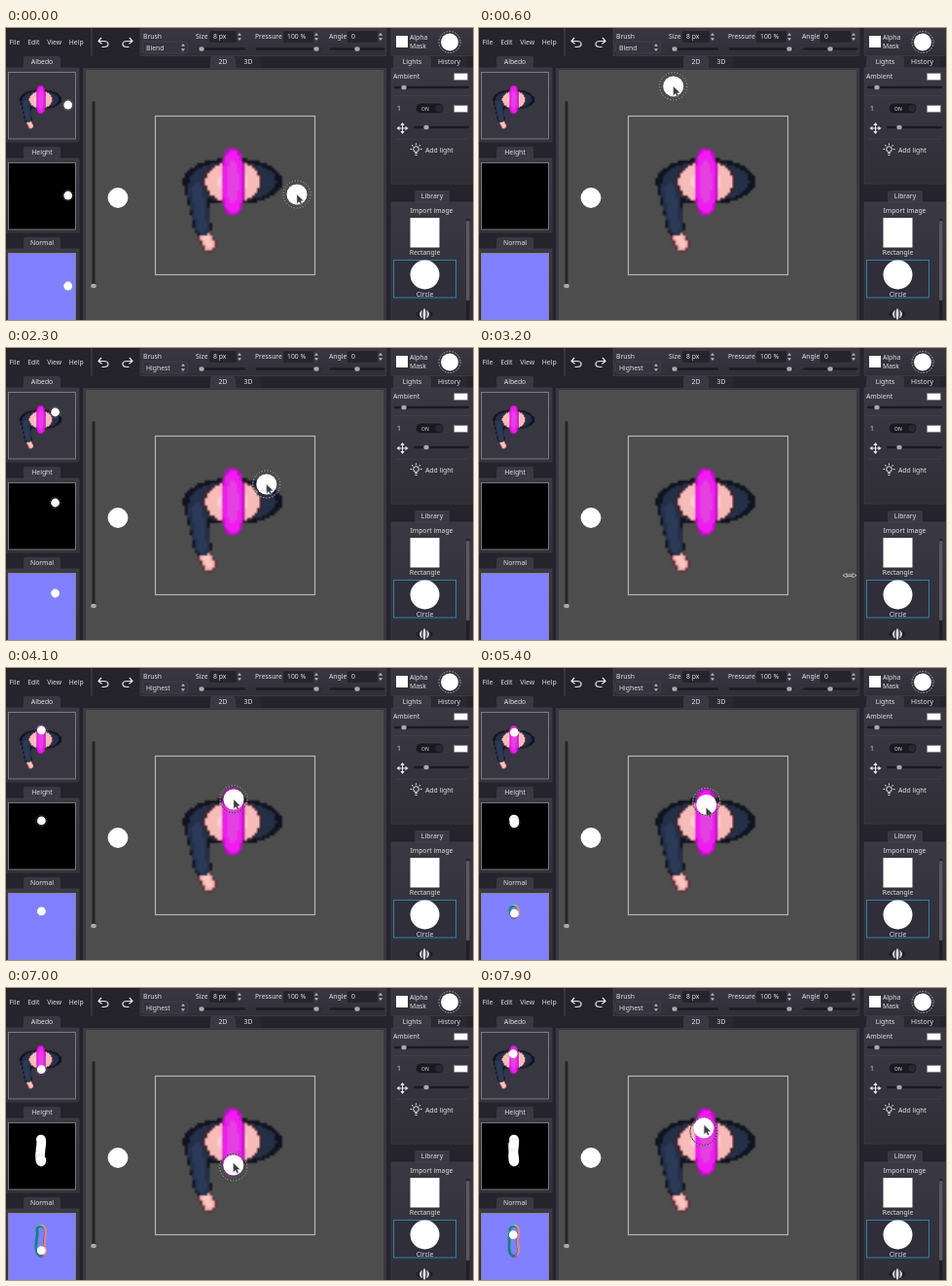
These frames come from a looping animation (480 px wide and 300 px high, 8000 ms). An HTML page with a canvas:

```html
<!DOCTYPE html>
<html lang="en">
<head>
<meta charset="utf-8">
<title>Brush blend modes</title>
<style>
html, body { margin: 0; width: 100%; height: 100%; overflow: hidden; background: #25232b; }
#stage { position: relative; width: 480px; height: 300px; overflow: hidden; }
#stage > * { position: absolute; left: 0; top: 0; }
#stage > #sprite { left: 153px; top: 90px; width: 164px; height: 164px; }
#stage > #mini { left: 2.4px; top: 45px; width: 69px; height: 69px; }
text { font: 6.8px "Noto Sans", sans-serif; fill: #e2e2e4; }
</style>
</head>
<body>
<div id="stage">
  <svg id="ui" width="480" height="300"></svg>
  <canvas id="sprite" width="64" height="64"></canvas>
  <canvas id="mini" width="64" height="64"></canvas>
  <svg id="live" width="480" height="300"></svg>
</div>
<script>
const $ = id => document.getElementById(id);

// --- interface helpers ---
const txt = (x, y, s, extra = '') => `<text x="${x}" y="${y}" ${extra}>${s}</text>`;
const mid = (x, y, s) => txt(x, y, s, 'text-anchor="middle"');
const box = (x, y, w, h, fill, extra = '') =>
  `<rect x="${x}" y="${y}" width="${w}" height="${h}" fill="${fill}" ${extra}/>`;
const line = (d, color = '#e8e8ea', w = 1.2) =>
  `<path d="${d}" fill="none" stroke="${color}" stroke-width="${w}"/>`;
const solid = (d, fill = '#e0e0e2') => `<path d="${d}" fill="${fill}"/>`;
const disc = (x, y, r, fill = '#fff') => `<circle cx="${x}" cy="${y}" r="${r}" fill="${fill}"/>`;
const oval = (x, y, rx, ry, fill) => `<ellipse cx="${x}" cy="${y}" rx="${rx}" ry="${ry}" fill="${fill}"/>`;
const panel = (x, y, w, h) => box(x, y, w, h, 'url(#face)', 'stroke="#45434f" stroke-width=".6"');
const tab = (x, y, w, s, on = true) =>
  solid(`M${x} ${y + 12}V${y + 2}q0-2 2-2H${x + w - 2}q2 0 2 2V${y + 12}Z`, on ? '#3a3843' : '#2a2830') +
  mid(x + w / 2, y + 8.3, s);
const slider = (x, y, w, knob) =>
  box(x, y - 1.2, w, 2.4, '#1b1a20', 'rx="1.2"') + oval(knob, y, 2.7, 2.3, '#a9a8ae');
const updown = (x, y) => solid(`M${x - 2} ${y - 1.2}l2-2.8 2 2.8zM${x - 2} ${y + 1.2}l2 2.8 2-2.8z`, '#b9b8be');
const spin = (label, x, value, vx, ax) =>
  txt(x, 11.3, label) + box(vx - 4, 3, ax - vx + 1, 12, '#26242b', 'rx="2"') + txt(vx, 11.3, value) + updown(ax, 9);
const swatch = y => box(460.5, y, 14, 7, '#fff', 'stroke="#77757e" stroke-width=".6"');
const thumbY = i => 45 + i * 93;
const thumb = (s, i, fill) =>
  tab(18, thumbY(i) - 16, 38, s) + panel(0, thumbY(i) - 4, 75, 76) +
  box(2.5, thumbY(i) + .5, 69, 68.5, fill, 'stroke="#8f8e95" stroke-width=".8"');

// four-way arrow: one arm, turned
const moveIcon = [0, 90, 180, 270].map(a =>
  `<path transform="translate(407.5 103) rotate(${a})" d="M0 .5V-.5H3V-2.2L6 0 3 2.2V.5Z" fill="#e8e8ea"/>`).join('');
const rays = [0, 45, 90, 135, 180].map(a =>
  `<path transform="translate(421.5 124.5) rotate(${-a})" d="M4.3 0H6" stroke="#eee"/>`).join('');

$('ui').innerHTML = `
<defs><linearGradient id="face" x2="0" y2="1">
  <stop stop-color="#3a3843"/><stop offset="1" stop-color="#302e37"/>
</linearGradient></defs>` +
  box(0, 0, 480, 300, '#25232b') +
  txt(3.5, 16.5, ['File', 'Edit', 'View', 'Help'].map((s, i) => `<tspan dx="${i && 7.8}">${s}</tspan>`).join('')) +
  line('M88 0V29', '#4a4853', 1) +
  line('M98 10l-3 3.5 3.5 2.7M95.5 13.5h5c6 0 6 6 0 6h-2') +
  line('M127 10l3 3.5-3.5 2.7M129.5 13.5h-5c-6 0-6 6 0 6h2') +
  panel(138, -1, 253, 29.5) + panel(396, -1, 85, 29.5) +
  txt(141, 10.6, 'Brush') + box(140.5, 14, 46, 12, '#35333d', 'rx="2" stroke="#4a4854" stroke-width=".6"') + updown(182, 20) +
  spin('Size', 195, '8 px', 213, 240) + spin('Pressure', 256, '100 %', 289, 319) + spin('Angle', 332, '0', 355, 385) +
  slider(197, 21.5, 49, 201) + slider(257, 21.5, 66, 319) + slider(333, 21.5, 56, 361) +
  box(401, 8, 12, 12, '#fff') + txt(415, 12, 'Alpha') + txt(415, 20.5, 'Mask') +
  disc(456, 14.5, 9) +
  '<circle cx="456" cy="14.5" r="11" fill="none" stroke="#c8c8cc" stroke-width=".8" stroke-dasharray="1.5"/>' +
  thumb('Albedo', 0, '#383641') + thumb('Height', 1, '#000') + thumb('Normal', 2, '#8080ff') +
  tab(210, 29, 26, '2D') + tab(236, 29, 26, '3D', false) +
  box(79, 41, 312, 260, '#393742') + box(82, 43, 306, 258, '#4d4d4d') +
  box(88.5, 75, 3, 190, '#25242a', 'rx="1.5"') + oval(90, 265, 2.8, 2.2, '#a9a8ae') +
  disc(115, 174.5, 10.4) +
  box(153.5, 90.5, 164, 163, 'none', 'stroke="#b4b4b4" stroke-width="1.2"') +
  tab(398, 29, 39, 'Lights') + tab(437, 29, 37, 'History', false) + panel(396, 41, 85, 119) +
  txt(398, 52, 'Ambient') + swatch(46.5) + slider(399, 61, 77, 409) +
  line('M399 69.5h77M399 114h77', '#4a4853', .6) +
  txt(402, 85.3, '1') + box(421, 77, 29, 11, '#191a20', 'rx="5.5" stroke="#4a4954" stroke-width=".6"') +
  txt(427, 84.5, 'ON', 'style="font-size:5px"') + disc(445, 82.5, 3.6, '#252a35') + swatch(79.5) +
  moveIcon + slider(419, 102, 57, 432) +
  '<circle cx="421.5" cy="124.5" r="2.8" fill="none" stroke="#eee"/>' + rays +
  line('M420 128.5h3M420.5 130.5h2', '#eee', .9) + txt(431, 127.5, 'Add light') +
  tab(420, 167, 36, 'Library') + panel(396, 179, 85, 122) + mid(437.5, 190.3, 'Import image') +
  box(415.5, 195, 30, 30.5, '#fff') + mid(430.5, 233, 'Rectangle') +
  box(398.5, 238.5, 64, 38.5, '#302e38', 'stroke="#2c83ad"') + disc(430.5, 253.5, 15) + mid(430.5, 275.8, 'Circle') +
  oval(430, 294, 9, 4, '#1b2233') + oval(430, 294, 5, 4.5, '#e8d2d2') + oval(430, 294, 2.8, 6.5, '#26262e') +
  oval(430, 294, 1.5, 6, '#dcdce2') +
  box(473, 196, 3.5, 104, '#222027', 'rx="1.5"') + box(473, 198, 3.5, 82, '#5a5863', 'rx="1.5"');

// --- pixel character: fields that are 0 at the core and 1 on the rim ---
const lens = (cx, cy, rx, ry, px = 2, py = 2) => (x, y) =>
  Math.sqrt(Math.abs((x - cx) / rx) ** px + Math.abs((y - cy) / ry) ** py);
const limb = (x1, y1, r1, x2, y2, r2) => (x, y) => {
  const dx = x2 - x1, dy = y2 - y1;
  const u = Math.min(1, Math.max(0, ((x - x1) * dx + (y - y1) * dy) / (dx * dx + dy * dy)));
  return Math.hypot(x - x1 - dx * u, y - y1 - dy * u) / (r1 + (r2 - r1) * u);
};
const shoulders = lens(233, 157.5, 51, 23.5, 2.2), arm = limb(196, 166, 12, 202, 205, 9);
const layers = [
  { field: limb(204, 214, 7, 209, 222, 8), rim: .8, tones: ['#fbc6c0', '#f4aeac', '#5c333b'] },
  { field: (x, y) => Math.min(shoulders(x, y), arm(x, y)), rim: .86, tones: ['#2b3b57', '#243049', '#10141f'] },
  { field: lens(233, 158, 31, 23), rim: .91, tones: ['#fdcfca', '#f6bab9', '#3c2530'] },
  { field: lens(233, 158, 12, 35.5, 2, 3), rim: .86, tones: ['#e440e2', '#f01cf0', '#bb12c2'] }
];

const art = $('sprite').getContext('2d'), px = 164 / 64;
for (const { field, rim, tones } of layers)
  for (let j = 0; j < 64; j++) for (let i = 0; i < 64; i++) {
    const v = field(153 + (i + .5) * px, 90 + (j + .5) * px);
    if (v > 1) continue;
    art.fillStyle = tones[v > rim ? 2 : v > .5 ? 1 : 0];
    art.fillRect(i, j, 1, 1);
  }
$('mini').getContext('2d').drawImage($('sprite'), 0, 0);

// --- moving layer ---
const modes = ['Blend', 'Add', 'Subtract', 'Multiply', 'Highest', 'Lowest'];
const rowY = i => 33.7 + i * 8.9;
const trail = (dx, dy, color, w) =>
  `<use href="#trail" x="${dx}" y="${dy}" stroke="${color}" stroke-width="${w}"/>`;
const dab = '<g class="dab"><circle r="10.5" fill="#fff"/><circle r="13.5" fill="none" stroke="#999" stroke-width="1.2" stroke-dasharray="2"/></g>';
const preview = (i, body) =>
  `<g transform="translate(2.4 ${thumbY(i)}) scale(.42) translate(-153 -90)"><g clip-path="url(#frame)">${body}${dab}</g></g>`;
// rim colours follow the surface normal
const slopes = [270, 90, 45, 135, 0, 180].map(a => {
  const c = Math.cos(a * Math.PI / 180), s = Math.sin(a * Math.PI / 180);
  return trail(2.6 * c, -2.6 * s, `rgb(${128 + 110 * c},${128 + 100 * s},128)`, 21);
}).join('');

$('live').innerHTML = `
<defs>
  <path id="trail" fill="none" stroke-linecap="round" stroke-linejoin="round"/>
  <clipPath id="frame"><rect x="153" y="90" width="164" height="164"/></clipPath>
</defs>` +
  preview(0, '') + preview(1, trail(0, 0, '#fff', 23)) + preview(2, slopes + trail(0, 0, '#8080ff', 13)) + `
<g id="mode">${txt(144, 22.5, '')}</g>
<g id="menu">${box(143, 28, 42.5, 57, '#28262e', 'stroke="#47454f" stroke-width=".6"')}
  <rect id="pick" x="143.5" width="41.5" height="9" fill="#4a4854"/>` +
  modes.map((s, i) => disc(150, rowY(i), 3, '#dcdce0') + (i ? '' : disc(150, rowY(i), 1.8, '#28262e')) +
    txt(155.5, rowY(i) + 2.4, s)).join('') + `</g>
<g id="brush">
  <g id="ring" fill="none" stroke-width=".9"><circle r="14" stroke="#333"/><circle r="14" stroke="#bbb" stroke-dasharray="1.5"/></g>
  <circle id="tip" r="10.5" fill="#fff"/>
</g>
<path id="arrow" d="M0 0V9.5L2.3 7.4 3.9 10.6 5.4 9.9 4 6.8 6.8 6.5Z" fill="#3a3a40" stroke="#bbb" stroke-width=".5"/>
<g id="resize" stroke="#ccc" stroke-width=".8" fill="#333"><path d="M-7 0l4-2v4zM7 0l-4-2v4z"/><path d="M-3 -.8h6M-3 .8h6"/></g>`;

// pointer stops: time, x, y
const stops = [
  [0, 299, 171], [900, 165, 21], [1050, 165, 21], [1500, 166, 68], [1950, 167, 71],
  [2800, 440, 258], [2900, 440, 258], [3850, 190, 155], [4100, 234, 135], [4950, 233, 132]
];
const paintStart = 4400, sweepStart = 4950;
const pos = t => {
  t = Math.max(t, 0);
  if (t >= sweepStart) // one slow stroke down and back up
    return { x: 232.3 + 1.5 * Math.sin(t / 260), y: 159 - 27 * Math.cos((t - sweepStart) * .0018) };
  const i = stops.findIndex(k => k[0] > t), [a, ax, ay] = stops[i - 1], [b, bx, by] = stops[i];
  const u = (t - a) / (b - a), e = u * u * (3 - 2 * u);
  return { x: ax + (bx - ax) * e, y: ay + (by - ay) * e };
};
const place = (el, p) => el.setAttribute('transform', `translate(${p.x.toFixed(2)} ${p.y.toFixed(2)})`);
const show = (el, on) => { el.style.display = on ? '' : 'none'; };
const dabs = [...document.querySelectorAll('.dab')], modeText = $('mode').firstElementChild;

function draw(t) {
  const p = pos(t), painting = t >= paintStart;
  const menuOpen = t >= 1000 && t < 2000;
  const inView = p.x > 82 && p.x < 380 && p.y > 43 && !menuOpen;
  const onSplit = p.x >= 380 && p.x < 394 && p.y > 41;

  show($('brush'), inView);
  place($('tip'), p);
  place($('ring'), pos(painting ? t - 90 : t));
  for (const d of dabs) { show(d, inView); place(d, p); }

  place($('arrow'), painting ? pos(t + 80) : p);
  place($('resize'), p);
  show($('arrow'), !onSplit);
  show($('resize'), onSplit);

  show($('menu'), menuOpen);
  const row = Math.round((pos(t - 100).y - rowY(0)) / 8.9);
  show($('pick'), row >= 0);
  $('pick').setAttribute('y', rowY(row) - 4.5);
  modeText.textContent = t < 2000 ? 'Blend' : 'Highest';

  let d = '';
  for (let s = paintStart; s <= t; s += 50) {
    const q = pos(s);
    d += (d ? 'L' : 'M') + q.x.toFixed(1) + ' ' + q.y.toFixed(1);
  }
  $('trail').setAttribute('d', d);
}

const begin = performance.now();
let last = -1;
function tick() {
  const t = Math.floor((performance.now() - begin) % 8000 / 100) * 100;
  if (t !== last) draw(last = t);
  requestAnimationFrame(tick);
}
tick();
</script>
</body>
</html>
```
